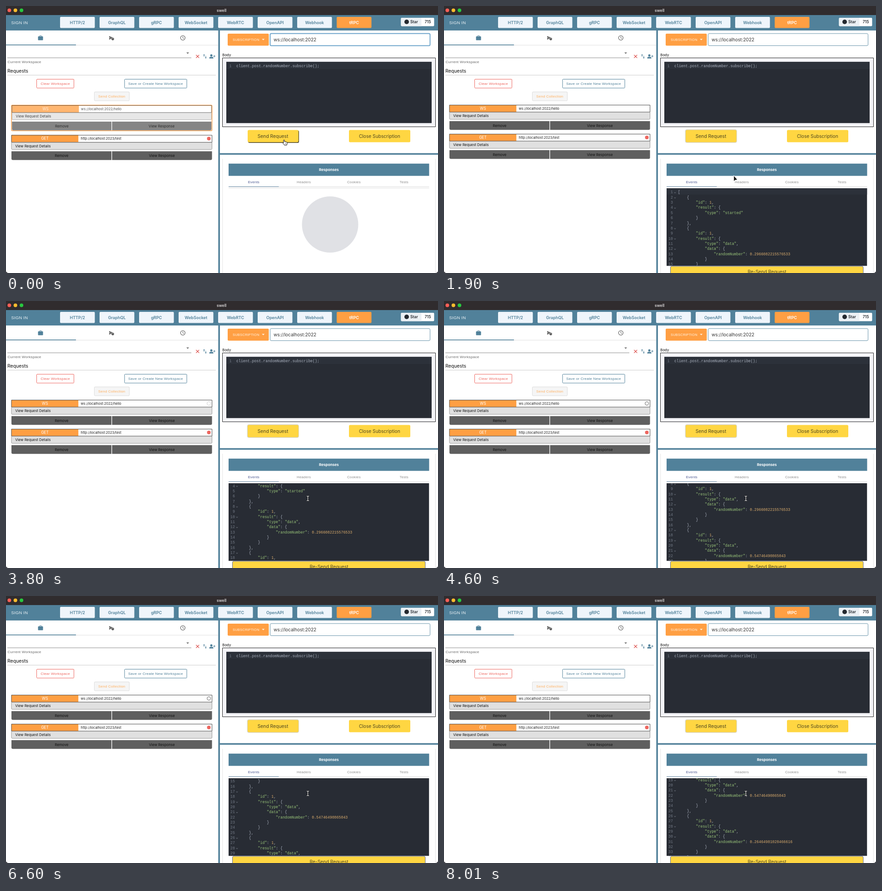
An HTML page with a canvas for the animation above (8120 ms loop, 951x589 px).

```html
<!DOCTYPE html>
<html lang="en">
<head>
<meta charset="utf-8">
<title>swell</title>
<style>
html, body { margin: 0; width: 100%; height: 100%; overflow: hidden; background: #fff; }
canvas { display: block; width: 951px; height: 589px; }
</style>
</head>
<body>
<canvas id="stage"></canvas>
<script>
const W = 951, H = 589, LOOP = 8120, STEP = 100;
const BLUE = '#51819a', ORANGE = '#ff9f43', YELLOW = '#ffd642', RED = '#ee6760';
const EDITOR = '#282c34', ACTIVE = '#2c313a', PLAIN = '#abb2bf';
const UI = 'Inter, sans-serif', ALT = '"Liberation Sans", Arial, sans-serif';
const MONO = '"Liberation Mono", "Courier New", monospace';
const FOCUS_LOST = 1000, RESPONSE = 1700, LINE = 11.34, CODE = 8.24;

const canvas = document.getElementById('stage');
const ctx = canvas.getContext('2d');
const dpr = window.devicePixelRatio || 1;
canvas.width = W * dpr;
canvas.height = H * dpr;

const events = [{ id: 1, result: { type: 'started' } }].concat(
  [0.2966082215576533, 0.54746490865043, 0.26464981028466616]
    .map(n => ({ id: 1, result: { type: 'data', data: { randomNumber: n } } })));
const lines = JSON.stringify(events, null, 4).split('\n');

function fill(x, y, w, h, color) {
  ctx.fillStyle = color;
  ctx.fillRect(x, y, w, h);
}

function box(x, y, w, h, r, color, border, lw = 1) {
  ctx.beginPath();
  ctx.roundRect(x, y, w, h, r);
  if (color) { ctx.fillStyle = color; ctx.fill(); }
  if (border) { ctx.strokeStyle = border; ctx.lineWidth = lw; ctx.stroke(); }
}

function disc(x, y, r, color) {
  ctx.beginPath();
  ctx.arc(x, y, r, 0, 7);
  ctx.fillStyle = color;
  ctx.fill();
}

function ring(x, y, r, color, lw) {
  ctx.beginPath();
  ctx.arc(x, y, r, 0, 7);
  ctx.strokeStyle = color;
  ctx.lineWidth = lw;
  ctx.stroke();
}

function poly(points, color, border, lw = 1) {
  ctx.beginPath();
  for (let i = 0; i < points.length; i += 2) ctx.lineTo(points[i], points[i + 1]);
  ctx.closePath();
  if (border) { ctx.strokeStyle = border; ctx.lineWidth = lw; ctx.stroke(); }
  if (color) { ctx.fillStyle = color; ctx.fill(); }
}

function line(x1, y1, x2, y2, color, lw = 1) {
  ctx.beginPath();
  ctx.moveTo(x1, y1);
  ctx.lineTo(x2, y2);
  ctx.strokeStyle = color;
  ctx.lineWidth = lw;
  ctx.stroke();
}

// y is the middle of the capitals
function text(s, x, y, size, color, { font = UI, weight = 400, align = 'left', gap = 0 } = {}) {
  ctx.font = `${weight} ${size}px ${font}`;
  ctx.letterSpacing = gap + 'px';
  ctx.textAlign = align;
  ctx.fillStyle = color;
  ctx.fillText(s, x, y + size * 0.36);
}

const center = { align: 'center' };
const alt = { font: ALT, gap: 0.23 };
const altCenter = { ...alt, align: 'center' };

function caret(x, y, color) {
  poly([x - 3, y - 1.5, x + 3, y - 1.5, x, y + 1.5], color);
}

// Smooth curve through [time, value] knots
function track(knots, t) {
  const n = knots.length - 1;
  if (t <= knots[0][0]) return knots[0][1];
  if (t >= knots[n][0]) return knots[n][1];
  const i = knots.findIndex(k => k[0] > t) - 1;
  const slope = j => {
    if (j <= 0 || j >= n) return 0;
    return (knots[j + 1][1] - knots[j - 1][1]) / (knots[j + 1][0] - knots[j - 1][0]);
  };
  const [t0, a] = knots[i], [t1, b] = knots[i + 1];
  const d = t1 - t0, u = (t - t0) / d, v = 1 - u;
  return a * v * v * (1 + 2 * u) + b * u * u * (3 - 2 * u) +
    d * u * v * (v * slope(i) - u * slope(i + 1));
}

const scrollKnots = [[2900, 0], [4600, 87], [5800, 134], [6600, 161], [8000, 209], [8800, 236]];
const cursorX = [[1300, 612], [2500, 664.5]];
const cursorY = [[100, 295], [700, 290.5], [1300, 290.5], [2500, 435.5]];

function header() {
  fill(0, 0, W, 20, '#302c2e');
  ['#fe5f57', '#febc2e', '#28c840'].forEach((c, i) => disc(7.3 + i * 13.4, 9.5, 4, c));
  text('swell', 474.5, 9.5, 8.5, '#c9c6c7', { ...center, weight: 700 });
  fill(0, 20, W, 34, BLUE);
  text('SIGN IN', 11.5, 36.5, 9.4, '#eef4f7', { font: ALT, gap: 0.27 });
  ['HTTP/2', 'GraphQL', 'gRPC', 'WebSocket', 'WebRTC', 'OpenAPI', 'Webhook', 'tRPC'].forEach((s, i) => {
    const x = 119 + i * 87, on = s === 'tRPC';
    box(x, 24, 76.5, 24.5, 2, on ? ORANGE : '#eff5fb');
    text(s, x + 38.2, 36.5, 9.05, on ? '#fff' : BLUE, { ...center, weight: 600 });
  });
  box(869.5, 26, 73, 18.5, 2, '#fff');
  box(869.5, 26, 45, 18.5, [2, 0, 0, 2], '#ebf0f4');
  disc(882, 35, 5, '#24292f');
  text('Star', 890, 35, 8.5, '#24292f', { weight: 600 });
  text('715', 928.5, 35, 8.5, '#24292f', { ...center, weight: 600 });
}

function icons() {
  box(70.5, 67, 11, 8.5, 1, BLUE);
  box(74, 65.3, 4, 2.5, 0.5, null, BLUE);
  poly([227, 66.5, 237, 70.3, 227, 74, 227, 71, 232, 70.3, 227, 69.5], '#555');
  disc(235, 72.8, 3.4, '#fff');
  disc(235, 72.8, 2.8, '#555');
  line(235, 71, 235, 73, '#fff', 0.7);
  ring(389.3, 70.3, 5, '#555', 1.1);
  line(389.3, 67, 389.3, 70.6, '#555');
  line(389.3, 70.6, 391.8, 72, '#555');
  line(418.3, 107.8, 425.2, 114.7, '#d8403c', 1.2);
  line(425.2, 107.8, 418.3, 114.7, '#d8403c', 1.2);
  line(436, 107, 436, 112, BLUE);
  poly([434, 108.8, 436, 106.3, 438, 108.8], BLUE);
  line(439.8, 110, 439.8, 115, BLUE);
  poly([437.8, 113.4, 439.8, 116, 441.8, 113.4], BLUE);
  disc(452, 109, 2.5, BLUE);
  box(447.5, 112.3, 9, 3.4, [2.5, 2.5, 0, 0], BLUE);
  line(456, 110.8, 461, 110.8, BLUE);
  line(458.5, 108.3, 458.5, 113.3, BLUE);
}

function pulse(t, x, y) {
  const u = ((t - 1050 + 2000) % 1000) / 1000;
  const fade = Math.min(1, (0.85 - u) * 2.1);
  if (fade <= 0) return;
  ctx.save();
  ctx.globalAlpha *= fade;
  ring(x, y, 3.9 * (1 - (1 - u) ** 4), '#555', 1.5);
  ctx.restore();
}

function card(y, method, url, inset) {
  const x = 12 + inset, w = 441.5 - 2 * inset;
  const mid = x + w / 2;
  fill(x, y, 147.3, 16, ORANGE);
  box(x, y + 0.5, w, 15.5, 0, null, '#4a4a4a');
  text(method, x + 73.7, y + 8, 8.3, '#fff', center);
  text(url, 164.5 + inset / 2, y + 8, 7.45, '#222');
  box(x, y + 16.5, w, 15.5, [0, 0, 2, 2], '#e0e0e0', '#999');
  text('View Request Details', x + 8.3, y + 24.2, 7.85, '#111');
  box(x, y + 36, mid - x - 0.7, 19.3, [0, 0, 0, 3], '#5f5f5f');
  box(mid + 0.7, y + 36, x + w - mid - 0.7, 19.3, [0, 0, 3, 0], '#5f5f5f');
  text('Remove', x + w / 4, y + 45.7, 7.85, '#111', center);
  text('View Response', x + w * 0.75, y + 45.7, 7.85, '#111', center);
}

function leftPane(t) {
  const pending = t < RESPONSE;
  line(0, 86.3, 467, 86.3, '#dedede');
  fill(0, 85, 154, 1.6, BLUE);
  icons();
  line(3, 114.3, 408, 114.3, '#8c8c8c');
  caret(400, 104, '#666');
  text('Current Workspace', 3.5, 122.7, 8.1, '#666', { font: ALT, gap: 0.26 });
  text('Requests', 3, 143.3, 10.5, '#111');
  line(3, 152.5, 462, 152.5, '#ccc');
  box(67.5, 161.5, 82, 19.5, 1.5, null, RED);
  text('Clear Workspace', 108.5, 171, 8, RED, altCenter);
  box(261, 161.5, 137, 19.5, 1.5, null, BLUE);
  text('Save or Create New Workspace', 329.3, 171, 8, BLUE, altCenter);
  box(194.5, 189.5, 77, 19.5, 1.5, '#f5f5f5', '#dcdcdc');
  text('Send Collection', 232.8, 199.3, 8, '#ffb061', altCenter);

  ctx.save();
  if (pending) {
    box(12, 218.7, 441.5, 56.6, 2, null, '#f9a04c', 1.5);
    ctx.globalAlpha = 0.76;
  }
  card(pending ? 219 : 218, 'WS', 'ws://localhost:2022/hello', pending ? 1.2 : 0);
  pulse(t, pending ? 445.3 : 446.5, pending ? 227 : 226);
  ctx.restore();
  const y = pending ? 284.5 : 282;
  card(y, 'GET', 'http://localhost:2023/test', 0);
  disc(446.5, y + 8, 4, RED);
}

function requestPane(t) {
  box(488, 61, 90.5, 26.5, 2, ORANGE);
  text('SUBSCRIPTION', 499, 74, 7.5, '#fff3e4', { font: ALT, gap: 0.21 });
  caret(566.3, 74, '#fff3e4');
  const focused = t < FOCUS_LOST;
  box(581.5, 60.8, 352, 26.7, 2.5, '#fff', focused ? '#6fa5cb' : '#6793a9', focused ? 2 : 1);
  text('ws://localhost:2022', 589, 74.3, 10.05, '#333');
  text('Body', 476.3, 108.3, 7.8, '#111');
  box(476.5, 114.5, 469, 152, 0, '#f4f4f8', '#222');
  fill(485, 123.3, 452, 135, EDITOR);
  fill(485, 123.3, 452, 15.7, ACTIVE);
  text('1', 491.5, 131.8, CODE, '#747b87', { font: MONO });
  text('client.post.randomNumber.subscribe();', 507, 131.8, CODE, PLAIN, { font: MONO });

  if (t < RESPONSE) box(533, 274.5, 112, 27.5, 3, '#4a4632');
  else box(530.8, 272.3, 114, 29.4, 4, '#d3d2cc');
  box(532, 273.6, 111.8, 27, 3, YELLOW);
  text('Send Request', 587.5, 287.3, 10.3, '#4f4820', center);
  box(755, 273.6, 135, 27, 2.5, YELLOW);
  text('Close Subscription', 822.3, 287.3, 10.2, '#4f4820', center);
}

function codeLine(s, n, y) {
  text(n, 504, y, CODE, '#747b87', { font: MONO, align: 'right' });
  if (/[[{]$/.test(s)) {
    line(506.8, y + 0.6, 508.5, y + 2, '#8b919c', 0.9);
    line(508.5, y + 2, 510.2, y + 0.6, '#8b919c', 0.9);
  }
  let x = 515;
  for (const part of s.match(/"[^"]*"|[\d.]+|[^"\d]+/g)) {
    const color = part[0] === '"' ? '#98c379' : /\d/.test(part) ? '#d9ab6c' : PLAIN;
    text(part, x, y, CODE, color, { font: MONO });
    x += part.length * CODE * 0.6;
  }
}

function responsePane(t) {
  line(476.8, 337, 476.8, H, '#e4e4e4');
  line(945.3, 337, 945.3, H, '#e4e4e4');
  fill(490, 347.7, 441.5, 27, BLUE);
  text('Responses', 710.8, 360.7, 8.1, '#fff', { ...center, weight: 700 });
  ['Events', 'Headers', 'Cookies', 'Tests'].forEach((s, i) =>
    text(s, 545.3 + i * 110.3, 388, 7.9, i ? '#8d8d8d' : '#4d5a92', { ...altCenter, gap: 0.2 }));
  line(490, 398.5, 931.5, 398.5, '#dcdcdc');
  line(490, 398.5, 600.5, 398.5, '#5c7f9a');
  if (t < RESPONSE) {
    line(490, 401.5, 931.5, 401.5, '#dcdcdc');
    disc(713.5, 482, 62, '#e0e1e5');
    return;
  }
  const scroll = track(scrollKnots, t);
  ctx.save();
  ctx.beginPath();
  ctx.rect(490, 402, 441.5, 171.5);
  ctx.clip();
  fill(490, 402, 441.5, 171.5, EDITOR);
  fill(490, 402 - scroll, 441.5, 14, ACTIVE);
  lines.forEach((s, i) => {
    const y = 410.5 + i * LINE - scroll;
    if (y > 392 && y < 584) codeLine(s, i + 1, y);
  });
  ctx.restore();
  box(498.5, 574, 424.5, 27, 3, YELLOW, '#5a6a9e');
  text('Re-Send Request', 711, 586, 10.35, '#4f4820', center);
}

function hand(x, y) {
  ctx.save();
  ctx.translate(x, y);
  ctx.beginPath();
  ctx.moveTo(-1, 7);
  ctx.lineTo(-1, 1);
  ctx.quadraticCurveTo(0.2, -0.6, 1.2, 1);
  ctx.lineTo(1.2, 4.2);
  ctx.lineTo(6, 5.2);
  ctx.quadraticCurveTo(7.6, 5.8, 7.2, 8);
  ctx.lineTo(6, 12);
  ctx.lineTo(1, 12);
  ctx.lineTo(-2.6, 7.4);
  ctx.quadraticCurveTo(-2.4, 6, -1, 7);
  ctx.closePath();
  ctx.fillStyle = '#fff';
  ctx.strokeStyle = '#111';
  ctx.lineWidth = 1;
  ctx.fill();
  ctx.stroke();
  for (const k of [2.6, 4.4]) line(k, 7.5, k, 10.2, '#333', 0.6);
  ctx.restore();
}

function beam(x, y) {
  for (const [color, lw] of [['#111', 2.6], ['#fff', 1.1]]) {
    line(x, y - 4.5, x, y + 4.5, color, lw);
    line(x - 2.6, y - 5, x + 2.6, y - 5, color, lw);
    line(x - 2.6, y + 5, x + 2.6, y + 5, color, lw);
  }
}

function cursor(t) {
  const x = track(cursorX, t), y = track(cursorY, t);
  if (y < 301) hand(x, y);
  else if (y > 402) beam(x, y);
  else poly([x, y, x, y + 11, x + 2.6, y + 8.6, x + 7, y + 8], '#111', '#fff', 1.6);
}

function draw(t) {
  ctx.setTransform(dpr, 0, 0, dpr, 0, 0);
  fill(0, 0, W, H, '#191a22');
  ctx.save();
  ctx.beginPath();
  ctx.roundRect(0, 0, W, H, [0, 0, 5, 5]);
  ctx.clip();
  fill(0, 0, W, H, '#fff');
  header();
  leftPane(t);
  requestPane(t);
  responsePane(t);
  fill(467.3, 54, 3.6, H - 54, BLUE);
  fill(470, 324.6, W - 470, 3.5, BLUE);
  cursor(t);
  ctx.restore();
}

let last = -1;
const start = performance.now();
function tick() {
  const t = Math.floor(((performance.now() - start) % LOOP) / STEP) * STEP;
  if (t !== last) draw(last = t);
  requestAnimationFrame(tick);
}
tick();
</script>
</body>
</html>
```
